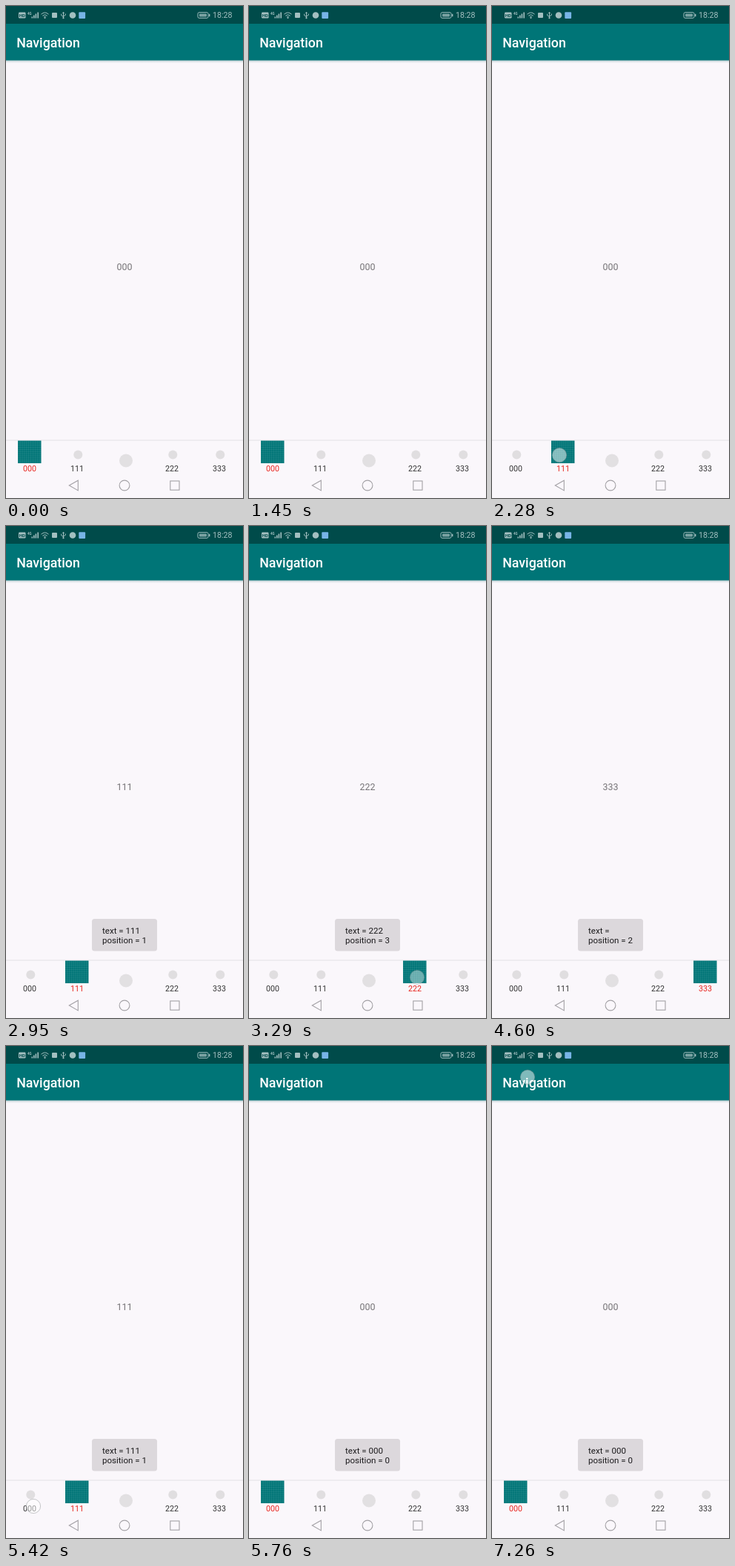
These frames come from a looping animation (320 by 665 pixels, 7.31 s). An HTML page:

```html
<!DOCTYPE html>
<html lang="en">
<head>
<meta charset="utf-8">
<title>Navigation</title>
<style>
  html, body { margin: 0; width: 100%; height: 100%; overflow: hidden; background: #faf7fb; }
  svg { display: block; width: 100vw; height: 100vh; font-family: Roboto, Arial, sans-serif; }
  .title { font-size: 17.78px; font-weight: 500; fill: #fff; }
  .page { font-size: 12.44px; fill: #757376; text-anchor: middle; }
  .label { font-size: 10.67px; fill: #333; text-anchor: middle; }
  .toast text { font-size: 11.56px; fill: #1c1b1d; }
  .nav { fill: none; stroke: #a3a1a5; stroke-width: 1.1; }
  .status { fill: #a3bfc0; }
  .status .line { fill: none; stroke: #a3bfc0; stroke-width: 1; }
  .on, .active .off { display: none; }
  .active .on { display: inline; }
  .active .label { fill: #e8251f; }
</style>
</head>
<body>
<svg viewBox="0 0 320 665">
  <defs>
    <pattern id="grid" width="2.88" height="2.88" patternUnits="userSpaceOnUse" x="-13" y="590.2">
      <path d="M0 .3H2.88M.3 0V2.88" stroke="#fff" stroke-opacity=".16" stroke-width=".5"/>
    </pattern>
    <linearGradient id="shade" x2="0" y2="1">
      <stop offset="0" stop-color="#b9cdd0"/>
      <stop offset="1" stop-color="#faf7fb"/>
    </linearGradient>
  </defs>

  <rect width="320" height="665" fill="#faf7fb"/>
  <rect y="73" width="320" height="4" fill="url(#shade)"/>
  <rect y="24" width="320" height="49.5" fill="#007577"/>
  <rect width="320" height="24" fill="#004b4a"/>

  <g class="status">
    <rect x="17" y="8.5" width="9.5" height="8" rx="1.2"/>
    <text x="21.8" y="14.9" font-size="6" font-weight="700" text-anchor="middle" style="fill:#004b4a">HD</text>
    <text x="29" y="11.5" font-size="4.5" font-weight="700">4G</text>
    <path d="M34.5 16.5v-2h1.6v2zM37 16.5v-4h1.6v4zM39.6 16.5v-6h1.6v6zM42.4 16.5v-8h1.6v8z"/>
    <path class="line" d="M47.5 11.2q5-4.6 10 0M49.3 13.2q3.2-2.8 6.4 0M51 15q1.5-1.2 3 0"/>
    <circle cx="52.5" cy="16.2" r=".9"/>
    <rect x="62" y="9" width="7" height="7" rx="1"/>
    <path class="line" d="M77.5 8.5v8M74.7 10.7v2l2.8 1.8M80.3 10.5v1.8l-2.8 1.6M76.3 9.7l1.2-1.4 1.2 1.4"/>
    <circle cx="77.5" cy="16.2" r="1.1"/>
    <circle cx="90" cy="12.5" r="4.3"/>
    <rect x="98.3" y="8.3" width="8.8" height="8.6" rx="1" fill="#78b4e6"/>
    <rect class="line" x="259" y="8.7" width="14" height="7.6" rx="1.8"/>
    <rect x="261" y="10.6" width="10" height="3.8" rx=".8" opacity=".75"/>
    <rect x="274" y="10.8" width="1.4" height="3.4"/>
    <text x="279" y="16.4" font-size="10.67">18:28</text>
  </g>

  <text class="title" x="14.2" y="55.8">Navigation</text>
  <text class="page" id="page" x="160" y="357.4">000</text>

  <g class="toast" id="toast" opacity="0">
    <rect x="116" y="531" width="88" height="43.5" rx="3.5" fill="#dcd8dc"/>
    <text id="line1" x="130" y="550.6"></text>
    <text id="line2" x="130" y="564.2"></text>
  </g>

  <rect y="586.5" width="320" height="1" fill="#e4e1e5"/>
  <g id="tabs"></g>
  <circle cx="162" cy="614.5" r="9" fill="#e2e0e2"/>

  <g class="nav">
    <path d="M85.3 648L97.3 641.3V654.9Z"/>
    <circle cx="160" cy="648" r="6.9"/>
    <rect x="221.8" y="642" width="12.2" height="12.2"/>
  </g>

  <circle id="touch" r="9.6" fill="#fff" fill-opacity=".5" stroke="#8f9496" stroke-opacity=".5"/>
</svg>
<script>
  const LOOP = 7310;
  const $ = id => document.getElementById(id);

  // [time, position]; position 2 is the middle button without a label
  const selects = [[0, 0], [2280, 1], [3200, 3], [3750, 4], [4940, 1], [5500, 0]];
  const pages = [[0, 0], [2320, 1], [3250, 3], [3800, 4], [4990, 1], [5560, 0]];
  const toasts = [[2320, 1], [3250, 3], [3800, 4], [4380, 2], [4990, 1], [5560, 0]];
  // [down, gone, x, y]
  const taps = [
    [2130, 2570, 91, 607], [3050, 3490, 227, 610], [3630, 3970, 296, 620],
    [4160, 4600, 160, 617], [4790, 5230, 97, 624], [5370, 5760, 37, 622],
    [7190, 7700, 48, 42]
  ];
  const names = ["000", "111", "", "222", "333"];

  const clamp = v => Math.max(0, Math.min(1, v));
  const at = (list, t) => list.reduce((cur, [time, pos]) => t >= time ? pos : cur, -1);

  $("tabs").innerHTML = names.map((name, i) => {
    const x = 32 + 64 * i;
    return name && `<g data-pos="${i}">
      <circle class="off" cx="${x + 1.3}" cy="606.5" r="6" fill="#e0dee0"/>
      <g class="on">
        <rect x="${x - 16}" y="587.5" width="31.5" height="30.5" fill="#007577"/>
        <rect x="${x - 16}" y="587.5" width="31.5" height="30.5" fill="url(#grid)"/>
      </g>
      <text class="label" x="${x}" y="628.7">${name}</text></g>`;
  }).join("");
  const tabs = [...$("tabs").children];

  function setText(id, text) {
    if ($(id).textContent !== text) $(id).textContent = text;
  }

  function draw(t) {
    const selected = at(selects, t);
    tabs.forEach(tab => tab.classList.toggle("active", +tab.dataset.pos === selected));
    setText("page", names[at(pages, t)]);

    const pos = at(toasts, t);
    $("toast").setAttribute("opacity", clamp((t - toasts[0][0]) / 200));
    setText("line1", pos < 0 ? "" : "text = " + names[pos]);
    setText("line2", pos < 0 ? "" : "position = " + pos);

    const tap = taps.find(([down, gone]) => t >= down && t < gone);
    let alpha = 0;
    if (tap) {
      const [down, gone, x, y] = tap;
      alpha = Math.min(clamp((t - down) / 50), clamp((gone - t) / 250));
      $("touch").setAttribute("cx", x);
      $("touch").setAttribute("cy", y);
    }
    $("touch").setAttribute("opacity", alpha);
  }

  const start = performance.now();
  function tick() {
    draw((performance.now() - start) % LOOP);
    requestAnimationFrame(tick);
  }
  tick();
</script>
</body>
</html>
```
